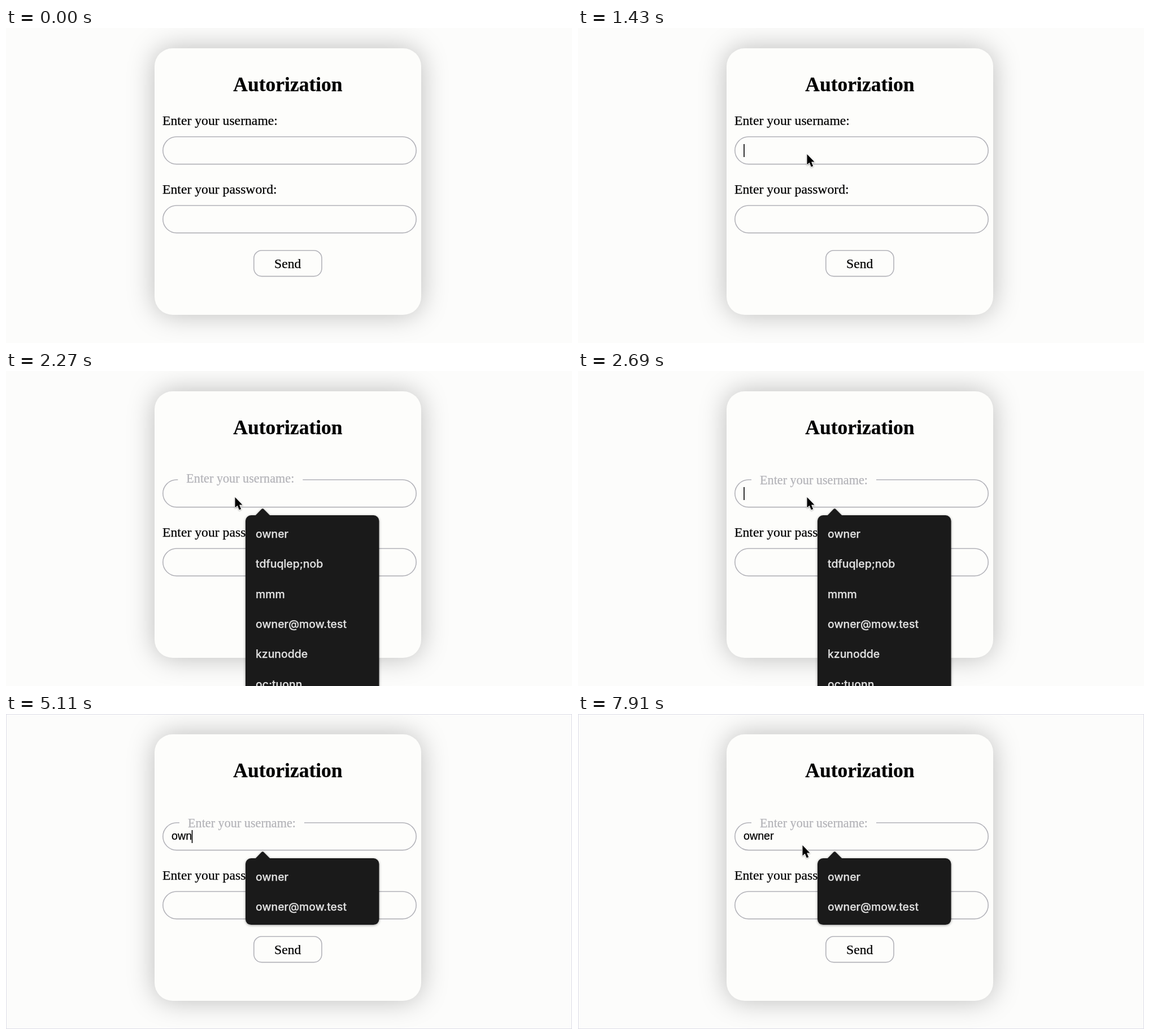
An HTML page for the animation above (8000 ms loop, 1002 by 559 pixels).

```html
<!DOCTYPE html>
<html lang="en">
<head>
<meta charset="utf-8">
<title>Autorization form</title>
<style>
  html, body { margin: 0; width: 100%; height: 100%; overflow: hidden; background: #fcfcfb; }
  .card {
    position: absolute; left: 263px; top: 35.5px; width: 472px; height: 473px;
    border-radius: 32px; background: #fdfdfb; box-shadow: 0 0 48px rgba(0, 0, 0, .26);
  }
  svg { position: absolute; left: 0; top: 0; }
  text { font: 23.7px "Liberation Serif", Times, serif; white-space: pre; stroke: #000; stroke-width: .25; }
  .title { font-size: 35.5px; font-weight: bold; }
  .box { fill: none; stroke: #b3b3b9; stroke-width: 1.6; }
  .edge { fill: none; stroke: #dcdce6; }
  #typed { font: 19.7px "Liberation Sans", Arial, sans-serif; }
  #label.floating { font-size: 22.2px; fill: #b3b3b8; stroke: #b3b3b8; }
  #popup { filter: drop-shadow(0 1px 2px rgba(0, 0, 0, .4)); fill: #1a1a1a; }
  #popup text { font: 500 19.4px Inter, sans-serif; fill: #e2e2e2; stroke: #e2e2e2; }
  #mouse { filter: drop-shadow(0 1px 1px rgba(0, 0, 0, .3)); }
</style>
</head>
<body>
<div class="card"></div>
<svg width="1002" height="559" viewBox="0 0 1002 559">
  <text class="title" x="499" y="112" text-anchor="middle">Autorization</text>

  <rect class="box" x="277.8" y="193" width="448.4" height="48.6" rx="24.3"/>
  <rect id="gap" x="-15" y="-21" width="221" height="26" fill="#fdfdfb"/>
  <text id="label">Enter your username:</text>
  <text id="typed" x="293" y="223"></text>
  <rect id="caret" y="206" width="1.6" height="23"/>

  <text x="277" y="294">Enter your password:</text>
  <rect class="box" x="277.8" y="315" width="448.4" height="48.6" rx="24.3"/>

  <rect class="box" x="438.8" y="394.8" width="120.2" height="45.8" rx="14"/>
  <text x="498.7" y="425.5" text-anchor="middle">Send</text>

  <g id="popup">
    <path d="M441 257L452 245.500Q454.300 243 456.600 245.500L468 257Z"/>
    <rect id="panel" x="424" y="256" rx="10"/>
    <g id="items"></g>
  </g>

  <path id="edgeStart" class="edge" d="M.5 8V272M1001.500 8V270M418 558.500H670"/>
  <rect id="edgeFull" class="edge" x=".5" y=".5" width="1001" height="558"/>

  <path id="mouse" d="M0 0V18.500L4.200 14.700L7.300 22.300L10.700 20.900L7.600 13.400H13Z"
    stroke="#fff" stroke-width="2" paint-order="stroke" stroke-linejoin="round"/>
</svg>
<script>
const LOOP = 8000;
const FOCUS = 1400, POPUP = 1695, FLOAT = 900;
const WORD = "owner";
const KEYS = [3600, 4350, 5050, 5750, 6350];
const ALL = ["owner", "tdfuqlep;nob", "mmm", "owner@mow.test", "kzunodde", "oc;tuonn"];
const SOME = ["owner", "owner@mow.test", "owls@noom.test"];

// time, x, y of the pointer tip
const ENTER = [[420, 120, 565], [770, 340, 268], [870, 384, 236], [910, 406, 225], [1050, 406, 225], [1100, 405.5, 224]];
const LEAVE = [[7730, 405.5, 224], [7910, 397.5, 233]];

const el = id => document.getElementById(id);
const show = (id, on) => { el(id).style.display = on ? "" : "none"; };
const place = (id, x, y) => el(id).setAttribute("transform", `translate(${x} ${y})`);
const clamp = p => Math.min(1, Math.max(0, p));

// The CSS "ease" curve
function ease(p) {
  let lo = 0, hi = 1, u;
  for (let i = 0; i < 20; i++) {
    u = (lo + hi) / 2;
    if (.75 * u * (1 - u) + u ** 3 < p) lo = u; else hi = u;
  }
  return .3 * u * (1 - u) ** 2 + 3 * u * u * (1 - u) + u ** 3;
}

function along(path, t) {
  const i = path.findIndex(point => point[0] > t);
  if (i < 0) return path[path.length - 1].slice(1);
  const [t0, x0, y0] = path[i - 1], [t1, x1, y1] = path[i];
  const p = (t - t0) / (t1 - t0);
  return [x0 + (x1 - x0) * p, y0 + (y1 - y0) * p];
}

function drawLabel(t) {
  const floating = t >= POPUP;
  const shift = 30 * ease(clamp((t - POPUP) / FLOAT));
  const x = floating ? 292 + shift : 277, y = floating ? 171 + shift : 172;
  place("label", x, y);
  place("gap", x, y);
  show("gap", floating);
  el("label").classList.toggle("floating", floating);
}

function drawPopup(t, count) {
  const items = count === 0 ? ALL : count < 3 ? SOME : SOME.slice(0, 2);
  show("popup", t >= POPUP);
  el("panel").setAttribute("width", items.length === 3 ? 238 : 236.5);
  el("panel").setAttribute("height", 11.5 + 53.3 * items.length);
  el("items").innerHTML = items.map((s, i) => `<text x="442" y="${296 + 53.3 * i}">${s}</text>`).join("");
}

function drawInput(t, count) {
  const typed = el("typed");
  typed.textContent = WORD.slice(0, count);
  const since = t - (count ? KEYS[count - 1] : FOCUS);
  show("caret", since >= 0 && since % 1000 < 500);
  el("caret").setAttribute("x", 293.2 + (count ? typed.getComputedTextLength() - .6 : 0));
}

function drawMouse(t) {
  const back = t >= LEAVE[0][0];
  const visible = back || t >= ENTER[0][0] && t < KEYS[0];
  show("mouse", visible);
  if (visible) place("mouse", ...along(back ? LEAVE : ENTER, t));
}

function frame(now) {
  const t = now % LOOP;
  const count = KEYS.filter(k => k <= t).length;
  drawLabel(t);
  drawPopup(t, count);
  drawInput(t, count);
  drawMouse(t);
  show("edgeStart", t >= 3400 && t < 4700);
  show("edgeFull", t >= 4700);
  requestAnimationFrame(frame);
}
frame(performance.now());
</script>
</body>
</html>
```
